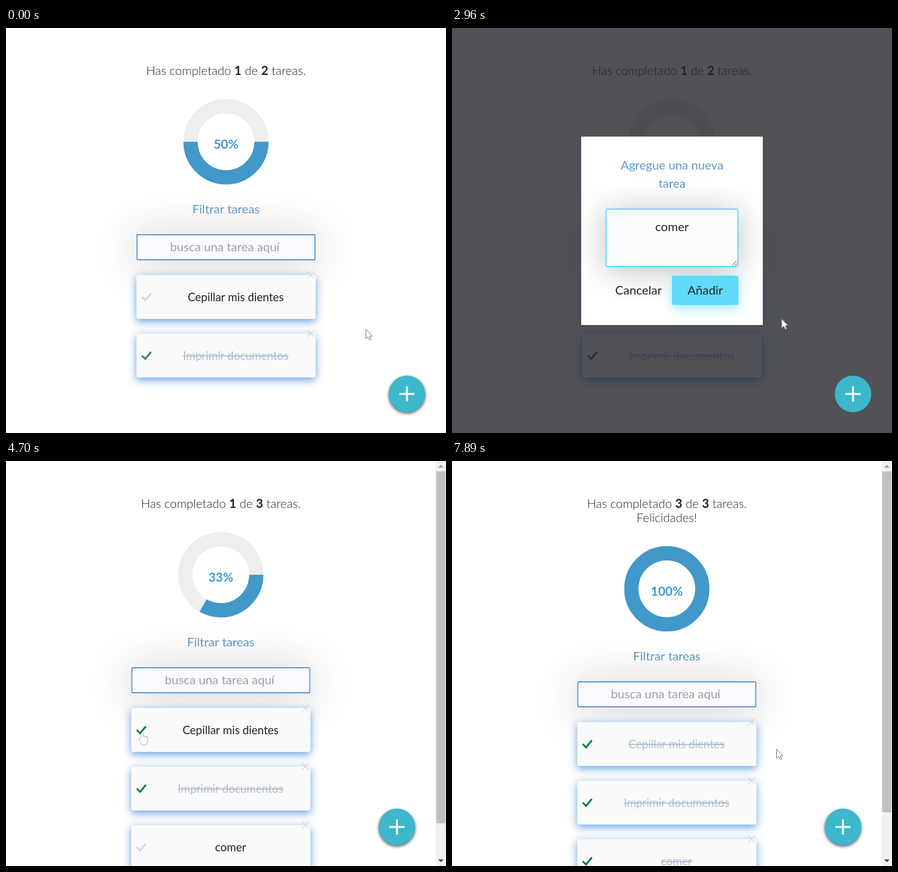
Animation, 722 px wide and 664 px high, one loop 7.99 s. Source, as an HTML page with a canvas:

```html
<!DOCTYPE html>
<html lang="es">
<head>
<meta charset="utf-8">
<title>Tareas</title>
<style>
html, body { margin: 0; width: 722px; height: 664px; overflow: hidden; background: #fff; }
canvas { display: block; }
</style>
</head>
<body>
<canvas id="stage" width="722" height="664"></canvas>
<script>
const ctx = document.getElementById('stage').getContext('2d');
const W = 722, H = 664, LOOP = 7990;
const OPEN = 440, BLUR = 3400, ADDED = 3540, FIRST = 4810, THIRD = 6450;
const KEYS = [1850, 2020, 2160, 2250, 2430];
const DARK = '#202329', BLUE = '#6199cc', RING = '#4198c9';

// Pointer tip: time, x, y
const PATH = [
  [240, 590, 494], [440, 670, 595], [640, 670, 595], [1120, 545, 478],
  [2920, 545, 478], [3300, 404, 435], [3740, 404, 435], [4590, 223, 446],
  [5460, 223, 446], [6130, 223, 628], [6780, 223, 628], [7150, 385, 560],
  [7520, 520, 484], [7890, 532, 472]
];

const ease = p => 1 - Math.pow(1 - p, 2.2);
const clamp = v => Math.max(0, Math.min(1, v));

function pointer(t) {
  let a = PATH[0];
  for (const b of PATH) {
    if (t < b[0]) {
      const p = clamp((t - a[0]) / (b[0] - a[0] || 1));
      const s = p * p * (3 - 2 * p);
      return { x: a[1] + (b[1] - a[1]) * s, y: a[2] + (b[2] - a[2]) * s };
    }
    a = b;
  }
  return { x: a[1], y: a[2] };
}

function ringShare(t) {
  let v = 1 / 2;
  for (const [at, to] of [[ADDED, 1 / 3], [FIRST, 2 / 3], [THIRD, 1]])
    v += (to - v) * ease(clamp((t - at) / 600));
  return v;
}

function text(s, x, y, color, size = 20, weight = 400) {
  ctx.font = `${weight} ${size}px Lato, "Open Sans", sans-serif`;
  ctx.fillStyle = color;
  ctx.textAlign = 'center';
  ctx.fillText(s, x, y);
  return ctx.measureText(s).width;
}

function runs(parts, x, y) {
  const font = w => `${w} 20px Lato, "Open Sans", sans-serif`;
  const widths = parts.map(([s, w]) => (ctx.font = font(w), ctx.measureText(s).width));
  let left = x - widths.reduce((a, b) => a + b) / 2;
  ctx.textAlign = 'left';
  ctx.fillStyle = DARK;
  parts.forEach(([s, w], i) => {
    ctx.font = font(w);
    ctx.fillText(s, left, y);
    left += widths[i];
  });
}

function box(x, y, w, h, r, fill, shadow) {
  ctx.save();
  if (shadow) [ctx.shadowOffsetY, ctx.shadowBlur, ctx.shadowColor] = shadow;
  ctx.beginPath();
  ctx.roundRect(x, y, w, h, r);
  ctx.fillStyle = fill;
  ctx.fill();
  ctx.restore();
}

function border(x, y, w, h, r, color) {
  ctx.beginPath();
  ctx.roundRect(x + 1, y + 1, w - 2, h - 2, r);
  line(color, 1.8);
}

function line(color, width) {
  ctx.strokeStyle = color;
  ctx.lineWidth = width;
  ctx.stroke();
}

function poly(points, x = 0, y = 0) {
  ctx.beginPath();
  points.forEach(([px, py]) => ctx.lineTo(x + px, y + py));
}

function cross(x, y, r, color, width, turn) {
  ctx.save();
  ctx.translate(x, y);
  ctx.rotate(turn);
  ctx.beginPath();
  ctx.moveTo(-r, 0); ctx.lineTo(r, 0);
  ctx.moveTo(0, -r); ctx.lineTo(0, r);
  line(color, width);
  ctx.restore();
}

function ring(x, y, share) {
  ctx.beginPath();
  ctx.arc(x, y, 58.2, 0, Math.PI * 2);
  line('#eee', 23.4);
  ctx.beginPath();
  ctx.arc(x, y, 58.2, 0, Math.PI * 2 * share);
  line(RING, 23.4);
}

function card(x, y, label, done, check) {
  box(x, y, 294, 72, 4, '#fafafa', [4, 14, 'rgba(70,140,215,.85)']);
  poly([[9, 36], [14.5, 41.5], [24, 30]], x, y);
  ctx.lineJoin = 'miter';
  line(check, 3);
  const mid = x + 163;
  const w = text(label, mid, y + 42.5, done ? '#b0bfd2' : DARK, 18.5);
  if (done) {
    ctx.fillStyle = '#a3b9d0';
    ctx.fillRect(mid - w / 2, y + 36, w, 1.5);
  }
  cross(x + 286, y, 8, '#d2d4d6', 1.2, Math.PI / 4);
}

function page(t, hit) {
  const added = t >= ADDED, all = t >= THIRD;
  const cx = added ? 352.5 : 361, dy = all ? 23 : 0, left = cx - 147;
  const done = [t >= FIRST, true, all];
  const count = done.filter((d, i) => d && (i < 2 || added)).length;
  const total = added ? 3 : 2;

  runs([['Has completado ', 300], [String(count), 700], [' de ', 300],
    [String(total), 700], [' tareas.', 300]], cx, 77);
  if (all) text('Felicidades!', cx, 100, DARK, 20, 300);

  ring(cx, 186.5 + dy, ringShare(t));
  text(Math.round(count / total * 100) + '%', cx, 197.5 + dy, RING, 20.5, 700);
  text('Filtrar tareas', cx, 304 + dy, BLUE);

  box(left, 338 + dy, 294, 43, 2, '#fafbfe', [5, 70, 'rgba(32,35,41,.25)']);
  border(left, 338 + dy, 294, 43, 1, BLUE);
  text('busca una tarea aquí', cx - 2, 366 + dy, '#9d9fa1');

  ['Cepillar mis dientes', 'Imprimir documentos', 'comer'].slice(0, total).forEach((label, i) => {
    const y = 405 + i * 96 + dy;
    const over = t > ADDED && hit(left + 2, y - 1, 34, 72);
    const tick = over || done[i] ? (t < 1280 ? '#3f7d90' : '#078040') : '#d9d9d9';
    card(left, y, label, done[i], tick);
  });

  if (added) {
    ctx.fillStyle = '#f1f1f1';
    ctx.fillRect(705, 0, 17, H);
    ctx.fillStyle = '#c0c0c0';
    ctx.fillRect(706, 17, 15, (all ? 576 : 594) - 17);
    poly([[709, 11], [713.5, 6], [718, 11]]);
    ctx.fillStyle = '#a3a3a3';
    ctx.fill();
    poly([[709, 653], [713.5, 658], [718, 653]]);
    ctx.fillStyle = '#505050';
    ctx.fill();
  }
}

function modal(t, hit) {
  ctx.fillStyle = 'rgba(32,35,41,.785)';
  ctx.fillRect(0, 0, W, H);

  ctx.save();
  ctx.beginPath();
  ctx.rect(212, 178, 298, 309);
  ctx.clip();
  ctx.fillStyle = '#fff';
  ctx.fillRect(212, 178, 298, 309);
  text('Agregue una nueva', 361, 232, BLUE);
  text('tarea', 361, 262, BLUE);

  box(252, 296, 218, 96, 2, '#fafbfd', [5, 50, 'rgba(32,35,41,.3)']);
  border(252, 296, 218, 96, 2, t < BLUR ? '#61dafb' : BLUE);
  const typed = 'comer'.slice(0, KEYS.filter(k => t >= k).length);
  const w = typed ? text(typed, 361, 333, DARK) : 0;
  if (!typed) text('alimentar al gato', 361, 332, '#9d9fa1');
  const caret = typed ? t < 2960 : t < 1000 || t >= 1520;
  if (caret) {
    ctx.fillStyle = DARK;
    ctx.fillRect(Math.round(361 + w / 2), 312, 1, 26);
  }
  ctx.beginPath();
  ctx.moveTo(460, 389); ctx.lineTo(467, 382);
  ctx.moveTo(464.5, 389.5); ctx.lineTo(467.5, 386.5);
  line('#555', 1);

  text('Cancelar', 306, 437, DARK);
  const over = hit(361, 406, 109, 48);
  box(361, 406, 109, 48, 2, over ? '#82e1fc' : '#61dafb',
    over ? [4, 14, 'rgba(32,35,41,.4)'] : [6, 18, 'rgba(97,218,251,.6)']);
  text('Añadir', 415.5, 437, over ? '#fff' : DARK);
  ctx.restore();
}

function addButton(x, over, shade) {
  box(x - 30, 570, 60, 60, 30, over ? '#0ff' : '#3cb7cb',
    shade && [2, 5, 'rgba(32,35,41,.75)']);
  cross(x, 600, 12.5, '#fff', 3.2, 0);
}

function arrow(x, y) {
  poly([[0, 0], [0, 15], [3.5, 11.8], [6, 17], [8.3, 16], [6, 11], [10.5, 10.7]], x + .5, y + .5);
  ctx.closePath();
  ctx.fillStyle = '#fff';
  ctx.fill();
  line('#777', 1);
}

function hand(x, y) {
  ctx.beginPath();
  ctx.roundRect(x - 1.5, y, 3.4, 14, 1.7);
  for (let i = 0; i < 3; i++) ctx.roundRect(x + 1.5 + i * 2.6, y + 5.5 + i * .6, 3, 8, 1.5);
  ctx.moveTo(x - 4.5, y + 9.5);
  ctx.lineTo(x - 2.5, y + 9.5);
  ctx.lineTo(x + 9.5, y + 9.5);
  ctx.lineTo(x + 9, y + 14);
  ctx.lineTo(x + 7, y + 19);
  ctx.lineTo(x, y + 19);
  ctx.closePath();
  line('#888', 1.2);
  ctx.fillStyle = '#fff';
  ctx.fill();
}

function draw(t) {
  const p = pointer(t);
  const hit = (x, y, w, h) => p.x >= x && p.x <= x + w && p.y >= y && p.y <= y + h;
  const open = t >= OPEN && t < ADDED;
  const plusX = t >= ADDED ? 641.5 : 658;
  const overPlus = Math.hypot(p.x - plusX, p.y - 600) < 30;

  ctx.fillStyle = '#fff';
  ctx.fillRect(0, 0, W, H);
  page(t, hit);
  if (open) modal(t, hit);
  addButton(plusX, overPlus, !open);

  if (t >= KEYS[0] && t < 2960) return;
  const overTick = t >= ADDED && hit(207, 404, 34, 250);
  const overAdd = open && hit(361, 406, 109, 48);
  (overPlus || overTick || overAdd ? hand : arrow)(p.x, p.y);
}

const start = performance.now();
function tick() {
  draw((performance.now() - start) % LOOP);
  requestAnimationFrame(tick);
}
tick();
</script>
</body>
</html>
```
